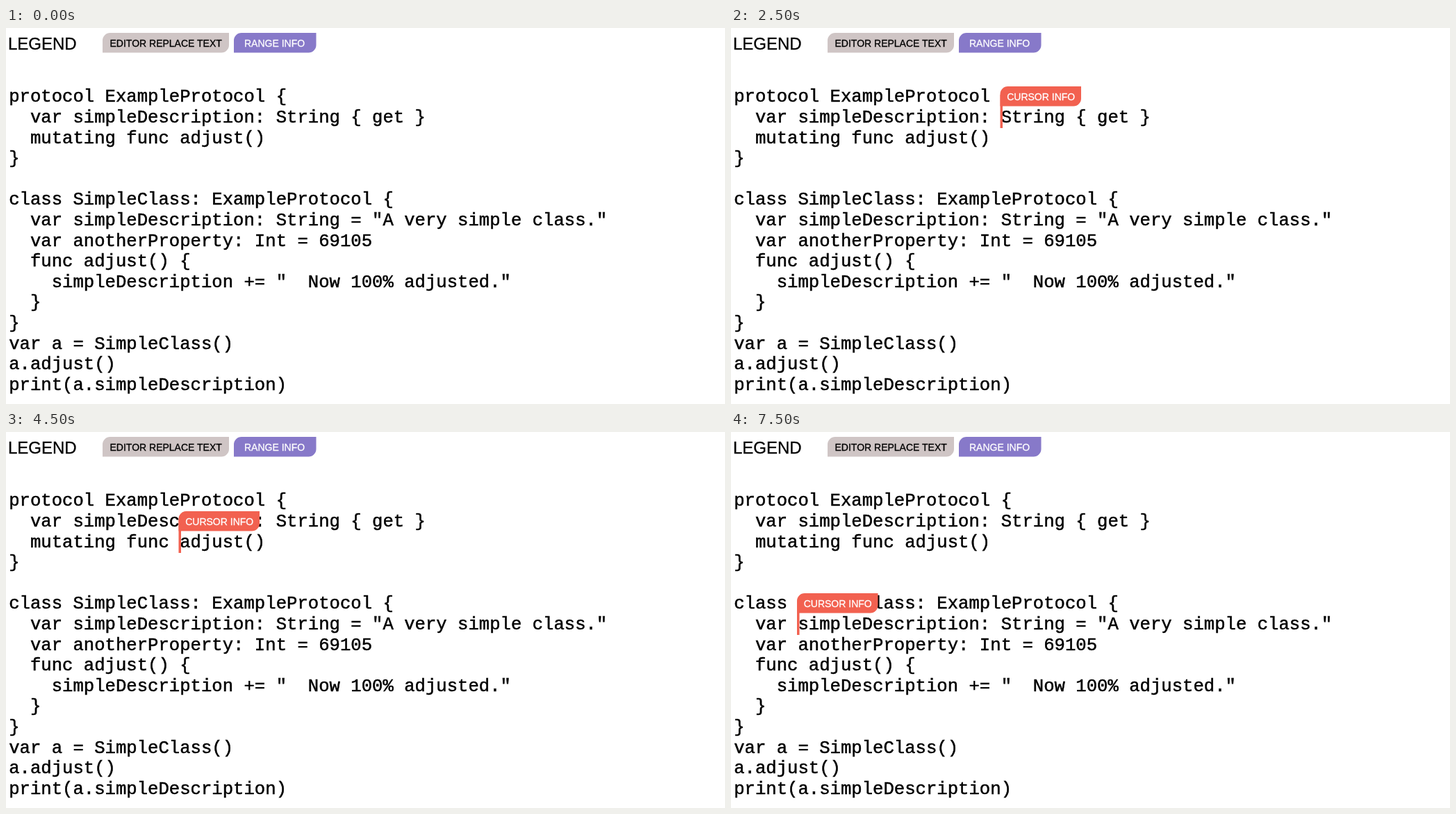
An HTML page for the animation above (8 s loop, 1035 by 541 pixels).

```html
<!DOCTYPE html>
<html lang="en">
<head>
<meta charset="utf-8">
<style>
  html, body { margin: 0; width: 100%; height: 100%; overflow: hidden; background: #fff; }
  svg { display: block; width: 1035px; height: 541px; }
  text { white-space: pre; stroke: currentColor; fill: currentColor; stroke-width: .3px; }
  .code { font: 25.64px "Liberation Mono", monospace; stroke-width: .5px; }
  .title { font: 24px "Liberation Sans", sans-serif; }
  .tag { font: 14px "Liberation Sans", sans-serif; }
</style>
</head>
<body>
<svg id="stage" viewBox="0 0 1035 541">
  <text class="title" x="3" y="30.5">LEGEND</text>
</svg>
<script>
const code = `protocol ExampleProtocol {
  var simpleDescription: String { get }
  mutating func adjust()
}

class SimpleClass: ExampleProtocol {
  var simpleDescription: String = "A very simple class."
  var anotherProperty: Int = 69105
  func adjust() {
    simpleDescription += "  Now 100% adjusted."
  }
}
var a = SimpleClass()
a.adjust()
print(a.simpleDescription)`;

const LINE = 29.6;
const stage = document.getElementById("stage");

function add(parent, name, attrs, text = "") {
  const el = document.createElementNS("http://www.w3.org/2000/svg", name);
  for (const key in attrs) el.setAttribute(key, attrs[key]);
  el.textContent = text;
  return parent.appendChild(el);
}

// Label rounded at the top left and bottom right
function addTag(parent, x, y, width, pad, fill, color, label) {
  const r = 11, h = 28.5;
  add(parent, "path", {
    d: `M${x} ${y + h}v${r - h}a${r} ${r} 0 0 1 ${r} ${-r}h${width - r}v${h - r}a${r} ${r} 0 0 1 ${-r} ${r}z`,
    fill
  });
  add(parent, "text", { class: "tag", x: x + pad, y: y + 19.5, color }, label);
}

code.split("\n").forEach((line, i) =>
  add(stage, "text", { class: "code", x: 4.2, y: 106.3 + i * LINE }, line));

addTag(stage, 139, 7, 182, 10.5, "#cfc5c5", "#000", "EDITOR REPLACE TEXT");
addTag(stage, 328, 7, 118.5, 15, "#8779c9", "#fff", "RANGE INFO");

const cursor = add(stage, "g", {});
add(cursor, "rect", { x: 0, y: 12, width: 3.5, height: 48, fill: "#f26150" });
addTag(cursor, 0, 0, 116.5, 9.7, "#f26150", "#fff", "CURSOR INFO");

// Cursor stops: left edge and code line
const stops = [[140.5, 0], [95, 1], [387.5, 1], [33, 2], [248.5, 2], [95, 5], [294.5, 5], [95, 6]];

function draw(now) {
  const stop = stops[Math.floor((now % 8000 - 500) / 1000)];
  cursor.setAttribute("visibility", stop ? "visible" : "hidden");
  if (stop) cursor.setAttribute("transform", `translate(${stop[0]} ${Math.round(54.4 + stop[1] * LINE)})`);
  requestAnimationFrame(draw);
}
draw(performance.now());
</script>
</body>
</html>
```
